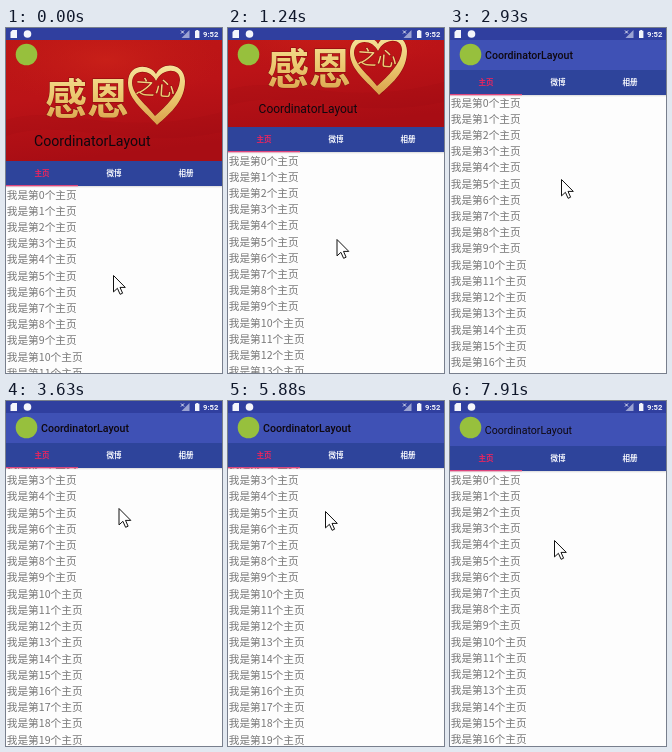
An HTML page for the animation above (8000 ms loop, 216 by 345 pixels).

```html
<!DOCTYPE html>
<html lang="zh">
<head>
<meta charset="utf-8">
<title>CoordinatorLayout</title>
<style>
html, body { margin: 0; width: 100%; height: 100%; overflow: hidden; background: #fdfdfd; }
svg { display: block; width: 100vw; height: 100vh; }
text { font-family: "Noto Sans CJK SC", "Noto Sans CJK JP", "Noto Sans CJK", sans-serif; }
.latin { font-family: Roboto, sans-serif; }
#rows { font-size: 10.7px; fill: #777; }
.tabs { font-size: 7.5px; font-weight: 700; fill: #f2f4fb; text-anchor: middle; }
</style>
</head>
<body>
<svg viewBox="0 0 216 345" preserveAspectRatio="none">
  <defs>
    <linearGradient id="red" x1="0" y1="0" x2="0.2" y2="1">
      <stop offset="0" stop-color="#bd1715"/>
      <stop offset="0.5" stop-color="#bb1317"/>
      <stop offset="1" stop-color="#a80d14"/>
    </linearGradient>
    <radialGradient id="glow">
      <stop offset="0" stop-color="#d0261a" stop-opacity="0.6"/>
      <stop offset="1" stop-color="#c41c18" stop-opacity="0"/>
    </radialGradient>
    <linearGradient id="gold" gradientUnits="userSpaceOnUse" x1="0" y1="38" x2="0" y2="97">
      <stop offset="0" stop-color="#f6e39a"/>
      <stop offset="0.5" stop-color="#ecc970"/>
      <stop offset="1" stop-color="#d9a04a"/>
    </linearGradient>
    <linearGradient id="shade" x1="0" y1="0" x2="0" y2="1">
      <stop offset="0" stop-color="#000" stop-opacity="0.14"/>
      <stop offset="1" stop-color="#000" stop-opacity="0"/>
    </linearGradient>
    <clipPath id="bannerClip"><rect id="bannerBox" y="12" width="216"/></clipPath>
  </defs>

  <rect width="216" height="345" fill="#fdfdfd"/>
  <g id="rows"></g>

  <g clip-path="url(#bannerClip)">
    <g id="photo">
      <rect y="12" width="216" height="122" fill="url(#red)"/>
      <ellipse cx="100" cy="32" rx="115" ry="46" fill="url(#glow)"/>
      <path d="M0 92C50 74 110 112 216 84V104C120 124 60 88 0 108Z" fill="#8f0a12" opacity="0.12"/>
      <g fill="url(#gold)" stroke="#7d0a0d" stroke-width="0.8" paint-order="stroke">
        <text x="39" y="86" font-size="42" font-weight="700">感恩</text>
        <text x="129" y="67" font-size="20" font-weight="500" transform="rotate(4 148 60)">之心</text>
        <path fill-rule="evenodd" d="M150 46C145 36 122 34 122 55C122 72 140 84 151 97C166 84 179 72 179 53C178 33 155 34 150 46Z
          M150 53C145 41 126 40 126 55C127 68 141 77 149 88C160 78 173 66 174 52C174 39 156 40 150 53Z"/>
      </g>
    </g>
    <rect id="scrim" y="12" width="216" height="122" fill="#3f51b5"/>
  </g>
  <circle cx="20.5" cy="26.5" r="10.8" fill="#97c03d"/>
  <text id="title" class="latin" fill="#0f080f">CoordinatorLayout</text>

  <g id="bar">
    <rect y="25" width="216" height="2" fill="url(#shade)"/>
    <rect width="216" height="25" fill="#2e449b"/>
    <g class="tabs">
      <text x="36" y="15.4" fill="#e8265f">主页</text>
      <text x="108" y="15.4">微博</text>
      <text x="180" y="15.4">相册</text>
    </g>
    <rect y="24.1" width="72" height="1.2" fill="#f0457a"/>
  </g>

  <rect width="216" height="12" fill="#303f9f"/>
  <g fill="#f4f5fb">
    <path d="M6.5 2H11V10H4.5V4Z"/>
    <circle cx="21.5" cy="6" r="3.8"/>
    <path d="M183.5 2V10H175.5Z" opacity="0.55"/>
    <path d="M175 2.5l3 3m0-3l-3 3" stroke="#f4f5fb" stroke-width="0.9"/>
    <path d="M189 2.8h1.2V2h2v.8h1.2V10H189Z"/>
    <text class="latin" x="197" y="8.8" font-size="7.7" font-weight="700">9:52</text>
  </g>

  <path id="cursor" d="M0 0V16.4L3.9 12.8L6.6 18.8L9.1 17.7L6.5 11.9H11.8Z"
    fill="#fff" stroke="#111" stroke-width="1" stroke-linejoin="round"/>
</svg>
<script>
const LOOP = 8000, STEP = 138.8, ROW = 16.22;
const OPEN = 133, CLOSED = 42, RANGE = OPEN - CLOSED;
const FULL_DRAG = 140;
const $ = id => document.getElementById(id);
const clamp = (v, lo, hi) => Math.min(hi, Math.max(lo, v));
const set = (id, attrs) => {
  for (const k in attrs) $(id).setAttribute(k, attrs[k]);
};

// pointer path: step, x, y
const path = [
  [0, 107, 247], [9, 108.5, 211], [15, 109.5, 190], [21, 111, 151], [26, 112.5, 107], [29, 112, 107],
  [37, 85, 80], [40, 92, 132], [44, 102, 88], [48, 102, 86], [57, 104, 139]
];

function pointer(n) {
  const i = path.findIndex(p => p[0] >= n) || 1;
  const [n0, x0, y0] = path[i - 1], [n1, x1, y1] = path[i];
  const u = (n - n0) / (n1 - n0);
  return { x: x0 + (x1 - x0) * u, y: y0 + (y1 - y0) * u };
}

// swipe up, free pointer, swipe down
function dragged(n, y) {
  if (n <= 26) return 247 - y;
  return n < 48 ? FULL_DRAG : Math.min(FULL_DRAG, 228.5 - y);
}

for (let i = 0; i < 24; i++) {
  const row = document.createElementNS("http://www.w3.org/2000/svg", "text");
  row.setAttribute("x", 0.7);
  row.setAttribute("y", 12.5 + i * ROW);
  row.textContent = `我是第${i}个主页`;
  $("rows").append(row);
}

function draw(t) {
  const n = Math.min(57, Math.floor((t % LOOP + 15) / STEP));
  const { x, y } = pointer(n);
  const d = dragged(n, y);
  const top = Math.round(OPEN - clamp(d - 1.5, 0, RANGE));
  const scroll = Math.round(Math.max(0, d - 95));
  const open = (top - CLOSED) / RANGE;

  set("rows", { transform: `translate(0 ${top + 25 - scroll})` });
  set("bannerBox", { height: top - 12 });
  set("photo", { transform: `translate(0 ${(top - OPEN) * 0.88})` });
  set("scrim", { opacity: clamp((n * STEP - 2210) / 600, 0, 1) });
  set("title", {
    x: 35 - 7 * open,
    y: top - 11.4 - 3.6 * open,
    "font-size": 10.6 + 3.55 * open * open,
    "font-weight": open ? 400 : 500
  });
  set("bar", { transform: `translate(0 ${top})` });
  set("cursor", { transform: `translate(${x + 0.5} ${y + 0.5})` });
}

let origin;
function frame(now) {
  origin ??= now;
  draw(now - origin);
  requestAnimationFrame(frame);
}
draw(0);
requestAnimationFrame(frame);
</script>
</body>
</html>
```
